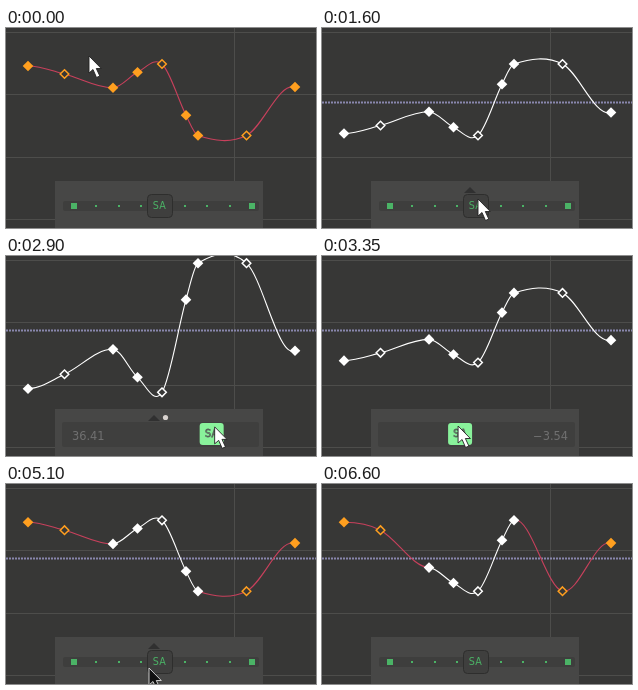
Animation of 310x200 px, one loop 6.7 s. Source, as an HTML page:

```html
<!DOCTYPE html>
<html lang="en">
<head>
<meta charset="utf-8">
<title>Curve scaling slider</title>
<style>
  html, body { margin: 0; width: 100%; height: 100%; overflow: hidden; background: #373736; }
  svg { display: block; width: 310px; height: 200px; }
  text { font-family: "DejaVu Sans", sans-serif; }
  .label { font-size: 9.6px; letter-spacing: .3px; text-anchor: middle; }
</style>
</head>
<body>
<svg viewBox="0 0 310 200">
  <rect width="310" height="200" fill="#373736"/>
  <path d="M0 4.5H310M0 66.5H310M0 129.5H310M0 191.5H310M228.5 0V200" stroke="#4d4d4b" fill="none"/>
  <path id="average" d="M0 74.5H310" stroke="#8987ad" stroke-width="2" stroke-dasharray="2 1"/>
  <g id="segments" fill="none" stroke-width="1.1"></g>
  <g id="keys" stroke-width="1.5"></g>
  <rect x="49" y="153" width="208" height="47" fill="#474746"/>
  <path id="arrow" d="M142 165L148 159L154 165Z" fill="#303030"/>
  <circle id="dot" cx="159.5" cy="161.5" r="2.6" fill="#d8d2ce"/>
  <g id="resting">
    <rect x="57" y="173" width="196" height="10" rx="2" fill="#3e3e3d"/>
    <g id="stops" fill="#4bb366"></g>
    <rect x="141.5" y="166.5" width="25" height="23" rx="4" fill="#3f3f3e" stroke="#2e2e2d"/>
    <text class="label" x="153.5" y="181.3" fill="#4bb366">SA</text>
  </g>
  <g id="dragging">
    <rect x="56" y="166" width="197" height="25" rx="2" fill="#3f3f3e"/>
    <text id="value" y="184" font-size="11.4" fill="#707070"></text>
    <g id="handle">
      <rect x="-12" y="167" width="24" height="22" rx="3" fill="#89f29b"/>
      <text class="label" y="181.3" fill="#89d796" stroke="#56645a" stroke-width=".8">SA</text>
    </g>
  </g>
  <path id="cursor" d="M0 0V17L4 13.5L7.5 21.5L10.8 20L7.3 12.5H12.3Z" stroke-width=".9"/>
</svg>
<script>
const LOOP = 6700, STEP = 50, PIVOT = 71.75, CENTER = 153;
const LEFT_REACH = 79.26, RIGHT_REACH = 87.29;
const SELECT_ALL = 300, SELECT_MIDDLE = 4650;
const WHITE = "#fff", ORANGE = "#ff9f1f", RED = "#c8405c", BACK = "#373736";

const points = [[22, 38], [58.5, 46], [107, 59.8], [131.5, 44.3], [156, 36],
                [180, 87.3], [192, 107.5], [240.5, 107.5], [289, 59]];
const isHollow = i => i % 3 === 1;
const isMiddle = i => i >= 2 && i <= 6;

// While a drag lasts, the handle follows the cursor.
const drags = [[750, 1300], [1850, 3250], [3250, 3950], [5650, 6200]];

// Each move is [start, end, x, y] and sets out from where the last one ended.
const visits = [
  { from: 0, to: 4000, at: [83, 28], moves: [
    [0, 700, 146, 177], [750, 800, 132, 177], [850, 1100, 55, 177],
    [1250, 1600, 156, 171], [1850, 2440, 194, 171], [2450, 2800, 217, 171],
    [2800, 3250, 151, 170], [3250, 3350, 136.09, 170], [3350, 3800, 50, 170]] },
  { from: 4200, to: 4800, at: [90, -22], moves: [
    [4200, 4600, 205, 129], [4650, 4800, 240, -25]] },
  { from: 5000, to: 6500, at: [285, 188], dark: true, moves: [
    [5000, 5100, 143, 184], [5100, 5600, 147, 174], [5650, 6050, 55, 174],
    [6200, 6250, 48, 176]] }
];

const $ = id => document.getElementById(id);
function set(node, attrs) {
  for (const name in attrs) node.setAttribute(name, attrs[name]);
}
function add(parent, name, attrs = {}) {
  const node = document.createElementNS("http://www.w3.org/2000/svg", name);
  set(node, attrs);
  return parent.appendChild(node);
}
const show = (id, on) => set($(id), { visibility: on ? "visible" : "hidden" });
const clamp = (v, low, high) => Math.min(high, Math.max(low, v));
const smooth = p => p * p * (3 - 2 * p);

const visitAt = t => visits.find(v => t >= v.from && t < v.to);

function cursorAt(t) {
  const visit = visitAt(t);
  let [x, y] = visit.at;
  for (const [start, end, toX, toY] of visit.moves) {
    const p = smooth(clamp((t - start) / (end - start), 0, 1));
    x += (toX - x) * p;
    y += (toY - y) * p;
  }
  return [x, y];
}

function dragOffset([start, end], t) {
  const moved = cursorAt(clamp(t, start, end))[0] - cursorAt(start)[0];
  return clamp(moved, -LEFT_REACH, RIGHT_REACH);
}

const sliderValue = offset =>
  100 * Math.sign(offset) * (offset / (offset < 0 ? LEFT_REACH : RIGHT_REACH)) ** 2;

// The curve trails the slider by one step.
function scaleFor(drag, t) {
  const v = sliderValue(dragOffset(drag, t - STEP));
  return 1 + v * (v < 0 ? .02 : .0178);
}

function autoSlope(pos, i) {
  if (i === 0) return 0;
  if (i === pos.length - 1) return .3;
  const [x0, y0] = pos[i - 1], [x1, y1] = pos[i + 1];
  return (y1 - y0) / (x1 - x0);
}
const baseSlopes = points.map((p, i) => autoSlope(points, i));

const segments = points.slice(1).map(() => add($("segments"), "path"));
const keys = points.map(() => add($("keys"), "path"));
for (let k = -4; k <= 4; k++) {
  const size = Math.abs(k) === 4 ? 6 : 2;
  if (k) add($("stops"), "rect",
    { x: Math.round(157 + 22.2 * k) - size / 2, y: 178 - size / 2, width: size, height: size });
}

function drawCurve(t) {
  const [a, b, c, part] = drags.map(drag => scaleFor(drag, t));
  const scale = i => a * b * c * (isMiddle(i) ? part : 1);
  const pos = points.map(([x, y], i) => [x, PIVOT + (y - PIVOT) * scale(i)]);
  const slope = pos.map((p, i) => isHollow(i) ? autoSlope(pos, i) : baseSlopes[i] * scale(i));
  const selected = i => t >= SELECT_ALL && (t < SELECT_MIDDLE || isMiddle(i));

  segments.forEach((node, i) => {
    const [x0, y0] = pos[i], [x1, y1] = pos[i + 1], h = (x1 - x0) / 3;
    set(node, {
      d: `M${x0} ${y0}C${x0 + h} ${y0 + slope[i] * h} ${x1 - h} ${y1 - slope[i + 1] * h} ${x1} ${y1}`,
      stroke: selected(i) && selected(i + 1) ? WHITE : RED
    });
  });
  keys.forEach((node, i) => {
    const open = isHollow(i), r = open ? 4.3 : 5.3, color = selected(i) ? WHITE : ORANGE;
    set(node, {
      d: `M0 ${-r}L${r} 0L0 ${r}L${-r} 0Z`,
      transform: `translate(${pos[i]})`,
      fill: open ? BACK : color,
      stroke: open ? color : "none"
    });
  });
}

function drawSlider(t) {
  const drag = drags.find(([start, end]) => t >= start && t < end);
  const hover = (t >= 650 && t < 3250) || (t >= 5050 && t < 6550);
  show("resting", !drag);
  show("dragging", drag);
  show("arrow", hover);
  show("dot", hover && drag);
  if (!drag) return;
  const offset = dragOffset(drag, t), v = sliderValue(offset);
  set($("handle"), { transform: `translate(${CENTER + offset})` });
  set($("value"), v > 0 ? { x: 66, "text-anchor": "start" } : { x: 246, "text-anchor": "end" });
  $("value").textContent = v.toFixed(2).replace("-", "−");
}

function drawCursor(t) {
  const visit = visitAt(t);
  show("cursor", visit);
  if (visit) set($("cursor"), {
    transform: `translate(${cursorAt(t)})`,
    fill: visit.dark ? "#111" : "#fff",
    stroke: visit.dark ? "#ddd" : "#222"
  });
}

function render(time) {
  const t = Math.floor(time % LOOP / STEP) * STEP;
  show("average", t >= SELECT_ALL);
  drawCurve(t);
  drawSlider(t);
  drawCursor(t);
}

const began = performance.now();
function tick() {
  render(performance.now() - began);
  requestAnimationFrame(tick);
}
tick();
</script>
</body>
</html>
```
